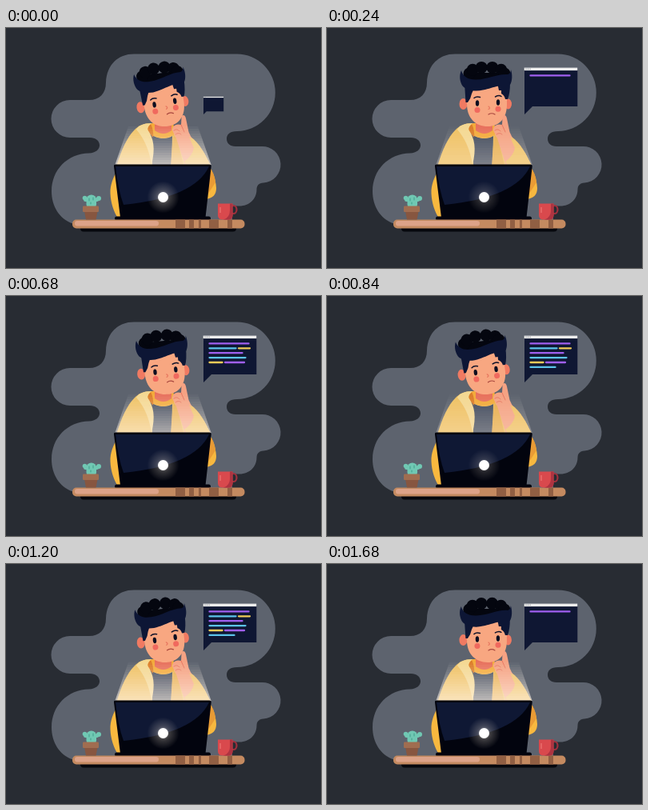
Animation of 394x300 px, one loop 1720 ms. Source, as an HTML page:

```html
<!DOCTYPE html>
<html lang="en">
<head>
<meta charset="utf-8">
<title>Thinking at the laptop</title>
<style>
html, body { margin: 0; width: 100%; height: 100%; overflow: hidden; background: #282c33; }
svg { display: block; width: 394px; height: 300px; }
</style>
</head>
<body>
<svg viewBox="0 0 394 300" xmlns="http://www.w3.org/2000/svg">
  <defs>
    <radialGradient id="halo">
      <stop offset="0" stop-color="#fff" stop-opacity=".7"/>
      <stop offset=".45" stop-color="#fff2df" stop-opacity=".25"/>
      <stop offset="1" stop-color="#fff2df" stop-opacity="0"/>
    </radialGradient>
    <clipPath id="beam"><path d="M153 123H240L257 172H136Z"/></clipPath>
    <clipPath id="lid"><path d="M137 170.500H254.500Q257 170.500 256.700 173L249.500 237H143L135 173Q134.500 170.500 137 170.500Z"/></clipPath>
  </defs>

  <!-- backdrop -->
  <path fill="#5d636e" d="M160 32.500H289A47.800 48.250 0 0 1 289 129C280 129 276 133 276 138.500C276 144 280 148 287 148H319.500A22.700 22.700 0 0 1 322 193.500C316 194 313.500 197 313.500 202C313.500 214 304 222.500 292 222.500H283V244H82C67 238 57 223 57 204C57 177 77 157 104 156.500C112 156 117 152 117 146.500C117 141 112 137 105 137H80A23.500 23.500 0 0 1 80 90H104C117 90 125 82 125 68C126 46 140 32.500 160 32.500Z"/>

  <!-- body -->
  <path fill="#f8b83f" d="M141 174C134 187 130 196 130.500 207C131 219 135 230 140 238H152V174Z"/>
  <path fill="#f8b83f" d="M250 168C258 176 262 187 263 200C263 208 259 213 249 214Z"/>
  <path fill="#e99b35" d="M254 174Q261 181 262 193L253 207Z"/>
  <path fill="#efc163" d="M182 119C172 119 166 122 161 127C151 137 144 153 138 173H256C250 158 242 144 231 136L208 122Z"/>
  <path fill="#424b5e" d="M179 131C187 139 201 140 208 135L207 173H183Q184 150 179 131Z"/>
  <path fill="#e8ae4e" d="M209 133L214 138L222 172H206Z"/>
  <path fill="#f3aa3a" d="M182 119C176 122 176 128 181 132C189 140 204 139 212 132L209 119Z"/>
  <path fill="#e8705c" d="M186 112H207V128Q197 136 186 128Z"/>
  <path fill="#dc7c29" d="M181 120Q175 124 179 131L184 137Q185 128 181 120Z"/>
  <path fill="#f4d892" d="M182 119C172 119 165 122 163 127C171 136 179 150 182 171C187 151 185 138 177 127Q177 123 182 119Z"/>

  <!-- head -->
  <g id="head">
    <g fill="#f07a62">
      <ellipse cx="170.500" cy="95" rx="5" ry="7"/>
      <ellipse cx="226.500" cy="95" rx="4.500" ry="6.500"/>
    </g>
    <path fill="#f8a781" d="M175 66H225V96C225 113 215 123 201 123C186 123 175 113 175 95Z"/>
    <g fill="#f0695e"><circle cx="188" cy="102.500" r="3.500"/><circle cx="214" cy="101.300" r="3.500"/></g>
    <path fill="#0d1635" d="M172 69H187L181 82Q180 88 176 93H173.500Z"/>
    <path fill="#0d1635" d="M213 68H229Q229 82 226 89H223Q222 84 218 82V78H215Z"/>
    <g id="curls" fill="#04060f"><path d="M171 56H226L224 67H174Z"/></g>
    <path fill="#0d1635" d="M168 53C170 61 177 65 187 64.500C202 64 213 57 226 58Q230 57 230 52C232 58 232 66 229 71C223 73 220 71.500 215 72.500C207 74 203 76 195 77.500C186 80 175 78 170 73C166 68 165 59 168 53Z"/>
    <g fill="none" stroke="#10132a" stroke-width="1.500" stroke-linecap="round">
      <path d="M184 87.500Q187 85 191.500 86.500M210.500 86Q215 83.500 218 85.500"/>
      <path stroke="#a9483f" stroke-width="1.200" d="M202 108Q206 105.500 210 108"/>
      <path stroke="#e77860" stroke-width="1.200" d="M202 98Q205 100 202 101.500"/>
    </g>
    <g fill="#0b0e20" id="eyes">
      <ellipse cx="188" cy="94" rx="2.200" ry="3.700"/><ellipse cx="214" cy="93" rx="2.200" ry="3.700"/>
    </g>
  </g>

  <!-- hand -->
  <path fill="#f5a283" d="M208 128C208 122 213 119 219 121L219.500 112Q219.500 109 222 109Q224 109 225 113L228.500 130L238 150L241 172H224L213 138Z"/>
  <path fill="none" stroke="#e87660" stroke-linecap="round" d="M219 121L223 130M210 128Q214 125 217 129M212 133Q216 130 219 133"/>
  <path fill="#efc163" d="M229 136C241 144 249 157 256 172H226L223 167Q233 160 235 150Z"/>

  <g id="light" clip-path="url(#beam)"></g>

  <!-- laptop -->
  <g clip-path="url(#lid)">
    <path fill="#02040e" d="M130 168H260V240H130Z"/>
    <path fill="#0f1834" d="M137 173H254Q236 212 147 221Q140 202 137 173Z"/>
  </g>
  <rect x="136" y="235.500" width="120" height="5" rx="2.500" fill="#02040e"/>
  <circle id="glow" cx="196.500" cy="211.500" r="20" fill="url(#halo)"/>
  <circle cx="196.500" cy="211.500" r="6.500" fill="#fff"/>

  <!-- desk -->
  <rect x="93" y="246" width="195" height="8.500" rx="4" fill="#05070d"/>
  <rect x="83" y="239.500" width="215.500" height="11" rx="5" fill="#c48a60"/>
  <rect x="86" y="241" width="105" height="6.500" rx="3.200" fill="#dca288"/>
  <path fill="#915f43" d="M212 239.500H224V250.500H212ZM229 239.500H235V250.500H229ZM241 239.500H244V250.500H241ZM254 239.500H266V250.500H254ZM277 239.500H283V250.500H277Z"/>

  <!-- plant -->
  <g fill="#70c8b3">
    <rect x="100.500" y="208.500" width="12.500" height="18" rx="6"/>
    <rect x="97" y="212.500" width="19" height="4.500" rx="2.200"/>
    <circle cx="98.500" cy="212.500" r="2.800"/><circle cx="116" cy="213" r="3"/>
  </g>
  <path fill="none" stroke="#3f9d8b" stroke-linecap="round" d="M104 213V216M109 212V215M106 218V220"/>
  <path fill="#875640" d="M98 229H114.500L112.500 239.500H100Z"/>
  <rect x="96" y="222.500" width="20" height="7.500" rx="1" fill="#a06d50"/>

  <!-- cup -->
  <ellipse cx="284.500" cy="227" rx="4" ry="5" fill="none" stroke="#9e303d" stroke-width="2.200"/>
  <path fill="#d9494d" d="M265 219.500H283.500V234Q283.500 239.500 278 239.500H271Q265 239.500 265 234Z"/>
  <path fill="#ad3441" d="M280 219.500H283.500V234Q283.500 239.500 278 239.500H272Q280 237 280 228Z"/>
  <path fill="none" stroke="#ef7774" stroke-width="1.200" d="M268 224V231"/>

  <!-- code bubble -->
  <g id="bubble">
    <path fill="#0f1733" d="M247 49.500H313.300V98H257L247 108Z"/>
    <rect x="246.700" y="49.500" width="66.600" height="3.600" fill="#efefed"/>
    <g fill="#858995"><circle cx="249" cy="51.300" r=".7"/><circle cx="251.500" cy="51.300" r=".7"/><circle cx="254" cy="51.300" r=".7"/></g>
    <g id="code" fill="none" stroke-width="2.300" stroke-linecap="round"></g>
  </g>
</svg>
<script>
const LOOP = 1720, STEP = 40;
const NS = 'http://www.w3.org/2000/svg';
const $ = id => document.getElementById(id);

function add(parent, tag, attrs) {
  const el = document.createElementNS(NS, tag);
  for (const k in attrs) el.setAttribute(k, attrs[k]);
  return parent.appendChild(el);
}

const clamp = v => Math.max(0, Math.min(1, v));
const span = (t, from, length) => clamp((t - from) / length);
const mix = (a, b, p) => a + (b - a) * p;
const smooth = p => p * p * (3 - 2 * p);
const backOut = (p, s = 1.3) => 1 + (s + 1) * (p - 1) ** 3 + s * (p - 1) ** 2;

// Curls sit along an arch over the forehead.
for (let i = 0; i < 6; i++) {
  const a = Math.PI * (1 - i / 5);
  add($('curls'), 'circle', { cx: 200 + 22 * Math.cos(a), cy: 57 - 8 * Math.sin(a), r: 7.5 });
}

// Light is built from thin bands that fade upwards.
const BANDS = 16;
for (let i = 0; i < BANDS; i++) {
  add($('light'), 'rect', {
    x: 130, y: 123 + i * 3, width: 132, height: 3,
    fill: '#fff5e9', opacity: .04 + .66 * i / BANDS
  });
}

// Each row: time it is typed, then its words as [color, width].
const PURPLE = '#a05ff0', CYAN = '#5cc3ea', YELLOW = '#f1cb58';
const TYPE = 80, ERASE = 56, ERASE_AT = 1400;
const rows = [
  { at: 120, words: [[PURPLE, 49]] },
  { at: 280, words: [[CYAN, 33], [YELLOW, 14]] },
  { at: 420, words: [[PURPLE, 41]] },
  { at: 520, words: [[CYAN, 45]] },
  { at: 600, words: [[YELLOW, 16], [PURPLE, 24]] },
  { at: 700, words: [[CYAN, 31]] }
];
rows.forEach((row, i) => {
  row.length = 0;
  row.words = row.words.map(([stroke, width]) => {
    const from = row.length, y = 59.4 + 5.9 * i;
    row.length += width + 3.5;
    return { from, width, el: add($('code'), 'line', { stroke, x1: 254.5 + from, y1: y, y2: y }) };
  });
});

function drawCode(t) {
  rows.forEach((row, i) => {
    const erased = i ? span(t, ERASE_AT + (rows.length - 1 - i) * ERASE, ERASE) : 0;
    const typed = (span(t, row.at, TYPE) - erased) * row.length;
    for (const { el, from, width } of row.words) {
      const shown = Math.min(width, typed - from);
      el.setAttribute('x2', 254.5 + from + Math.max(0, shown));
      el.setAttribute('visibility', shown > 0 ? 'visible' : 'hidden');
    }
  });
}

function draw(t) {
  const sway = -4 + 4 * Math.cos((t - 240) * Math.PI / 760);
  const tilt = mix(-8, sway, smooth(span(t, 0, 240)));
  $('head').setAttribute('transform', `rotate(${tilt} 200 112)`);

  const open = 1 - .75 * clamp(1.4 - Math.abs(t - 1000) / 70);
  $('eyes').setAttribute('transform', `translate(0 ${93.5 * (1 - open)}) scale(1 ${open})`);

  const glow = .72 + .28 * Math.cos(t * 6 * Math.PI / LOOP);
  $('light').setAttribute('opacity', glow);
  $('glow').setAttribute('opacity', .25 + .6 * glow);

  const size = mix(.38, 1, backOut(span(t, 0, 200)));
  $('bubble').setAttribute('transform', `translate(247 108) scale(${size}) translate(-247 -108)`);
  drawCode(t);
}

const start = performance.now();
function tick(now) {
  const t = Math.max(0, now - start) % LOOP;
  draw(Math.floor(t / STEP) * STEP);
  requestAnimationFrame(tick);
}
draw(0);
requestAnimationFrame(tick);
</script>
</body>
</html>
```
